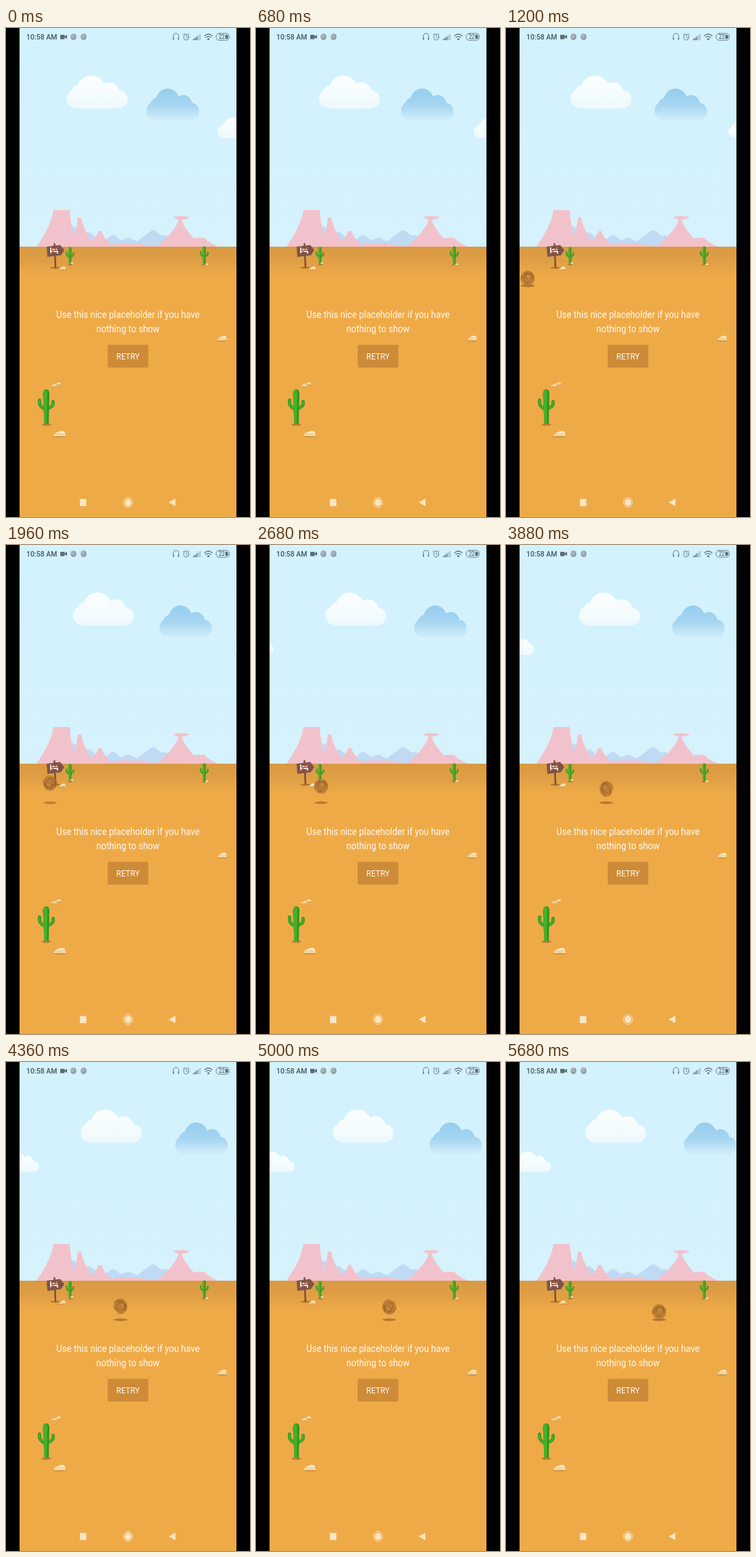
An HTML page with a canvas that plays this animation: 360 by 720 pixels, repeating every 5.72 s.

```html
<!DOCTYPE html>
<html lang="en">
<head>
<meta charset="utf-8">
<title>Desert placeholder</title>
<style>
  html, body { margin: 0; width: 100%; height: 100%; overflow: hidden; background: #000; }
  canvas { display: block; width: 360px; height: 720px; }
</style>
</head>
<body>
<canvas id="stage"></canvas>
<script>
const LOOP = 5720, STEP = 40, TALL = 1.12, HORIZON = 322;
const FONT = 'Roboto, "Noto Sans", sans-serif';
const canvas = document.getElementById('stage');
const ctx = canvas.getContext('2d');
const dpr = window.devicePixelRatio || 1;
canvas.width = 360 * dpr;
canvas.height = 720 * dpr;

const mix = (a, b, k) => a + (b - a) * k;

function at(x, y, sx, sy, draw) {
  ctx.save();
  ctx.translate(x, y);
  ctx.scale(sx, sy);
  draw();
  ctx.restore();
}

function fade(y0, y1, ...stops) {
  const g = ctx.createLinearGradient(0, y0, 0, y1);
  stops.forEach((c, i) => g.addColorStop(i / (stops.length - 1), c));
  return g;
}

function rect(x, y, w, h, fill, r = 0) {
  ctx.fillStyle = fill;
  ctx.beginPath();
  ctx.roundRect(x, y, w, h, r);
  ctx.fill();
}

function oval(x, y, rx, ry, fill) {
  ctx.fillStyle = fill;
  ctx.beginPath();
  ctx.ellipse(x, y, rx, ry, 0, 0, 7);
  ctx.fill();
}

function ring(x, y, rx, ry, stroke, width) {
  ctx.strokeStyle = stroke;
  ctx.lineWidth = width;
  ctx.beginPath();
  ctx.ellipse(x, y, rx, ry, 0, 0, 7);
  ctx.stroke();
}

function shape(d, fill) {
  ctx.fillStyle = fill;
  ctx.fill(new Path2D(d));
}

function line(d, stroke, width) {
  ctx.strokeStyle = stroke;
  ctx.lineWidth = width;
  ctx.lineCap = 'round';
  ctx.stroke(new Path2D(d));
}

function text(str, x, y, size, color, weight = 400, align = 'center') {
  at(x, y, 1, TALL, () => {
    ctx.font = `${weight} ${size}px ${FONT}`;
    ctx.textAlign = align;
    ctx.fillStyle = color;
    ctx.fillText(str, 0, 0);
  });
}

function rng(seed) {
  return () => (seed = (seed * 16807) % 2147483647) / 2147483647;
}

// One outline, 90 by 49, serves all clouds
const WHITE = ['#fbfeff', '#f6fcfe', '#edf9fd'];
const BLUE = ['#97cdee', '#a5d5f1', '#d3eefa'];

function puff(x, y, r) {
  ctx.moveTo(x + r, y);
  ctx.arc(x, y, r, 0, Math.PI * 2);
}

function cloud(colors, x, y, sx, sy) {
  at(x, y, sx, sy, () => {
    ctx.beginPath();
    puff(14, 34, 14);
    puff(19, 27, 13);
    puff(36, 21, 21);
    puff(63, 25, 15);
    puff(77, 35, 13);
    ctx.rect(12, 28, 66, 20.5);
    ctx.fillStyle = fade(0, 49, ...colors);
    ctx.fill();
  });
}

// A rock tower whose sides flare out towards the ground
function butte(left, right, topL, topR, y) {
  const bend = mix(y, HORIZON, .4);
  shape(`M${left} ${HORIZON}Q${mix(left, topL, .9)} ${bend} ${topL} ${y}H${topR}` +
        `Q${mix(right, topR, .9)} ${bend} ${right} ${HORIZON}Z`, '#f2c2cc');
}

function peak(x, y, half) {
  shape(`M${x - half} ${HORIZON}L${x - 2} ${y}H${x + 2}L${x + half} ${HORIZON}Z`, '#c0daf3');
}

function mountains() {
  peak(98, 292, 36);
  peak(122, 301, 28);
  peak(158, 305, 24);
  peak(180, 309, 30);
  peak(217, 298, 34);
  peak(234, 305, 22);
  butte(45, 104, 70, 94, 268);
  butte(95, 132, 106, 111, 279);
  butte(118, 158, 136, 141, 299);
  butte(138, 232, 165, 195, 317);
  butte(222, 290, 255, 259, 281);
  butte(255, 313, 279, 293, 309);
  shape('M247 278Q258 276 271 278Q268 282 259 282H255Q248 281 247 278Z', '#f2c2cc');
}

function rock(x, y, w, h) {
  oval(x, y + h * .45, w * .55, h * .2, 'rgba(160,105,35,.4)');
  at(x, y, w / 20, h / 9, () => {
    shape('M-10 4Q-7-1-2-2Q2-5 7-3L10 4Z', '#eed6a0');
    shape('M-6 0Q1-5 7-3L8 0Q1-2-6 0Z', '#faebc6');
  });
}

function cactus(x, y, s) {
  at(x, y, s, s, () => {
    oval(0, 0, 7, 1.8, 'rgba(120,70,20,.45)');
    const arms = 'M-10-36V-31Q-9-26-2-23M10-34V-30Q9-26 2-24';
    line(arms, '#2f931d', 4.8);
    line(arms, '#46b02a', 2.6);
    shape('M-5-46Q-4-52 0-52Q4-52 4.5-46L3.5-1H-3Z', '#2f931d');
    shape('M-5-46Q-4-52-1-52Q1.5-50 1.5-46L1-1H-3Z', '#46b02a');
  });
}

function sign() {
  oval(73, 353, 8, 1.5, 'rgba(120,70,20,.45)');
  line('M71.5 318L73 352', '#80523b', 2.6);
  shape('M60 322L80 319.5 86 327 81 334.5 61 337Z', '#7d5445');
  line('M66 324V331.5M66 329H76V331.5M69 326H75', '#ecdcd2', 2);
  line('M66 332L76.5 322.5', '#d4514a', 1.4);
}

function sky(t) {
  rect(20, 0, 320, HORIZON, fade(0, HORIZON, '#d2f2fe', '#d6f2fc'));
  cloud(WHITE, 89.5 + 4.8 * t, 70, 1, 1);
  cloud(BLUE, 207.5 + 9.68 * t, 89, .86, .97);
  const x = 312 + 13.33 * t;
  cloud(WHITE, x < 341 ? x : x - 377.7, 132, .62, .62);
}

function ground() {
  mountains();
  rect(20, HORIZON, 320, 398, '#efaa48');
  rect(20, HORIZON, 320, 44, fade(HORIZON, 366, '#d99942', '#e09f45', '#efaa48'));
  sign();
  cactus(94.5, 348.5, .5);
  cactus(292.5, 348.5, .52);
  rock(83, 353.5, 11, 5);
  rock(97, 346, 5, 3);
  rock(296, 348, 6, 3);
  rock(319, 456.5, 15, 8);
  rock(71, 526, 10, 4);
  rock(77, 523.5, 9, 4);
  rock(79, 597, 20, 9);
  cactus(59.5, 584, 1);
}

// Hop heights; gravity sets how long each one lasts
const HOPS = [11, 7, 18, 13.5, 14, 10, 9, 11, 11, 11];

function lift(t) {
  let left = t - .65;
  if (left < 0) return 0;
  for (const h of HOPS) {
    const time = .165 * Math.sqrt(h), u = left / time;
    if (u < 1) return h * 4 * u * (1 - u);
    left -= time;
  }
  return 0;
}

function tumbleweed(t) {
  const x = 32 + 43.3 * (t - 1.2), h = lift(t);
  oval(x, 379.5, 10.5 - h * .05, 1.9, `rgba(135,82,24,${.6 - h * .006})`);
  at(x, 368.5 - h, 1, TALL, () => {
    ctx.rotate(t * 4.2);
    oval(0, 0, 9.8, 9.8, 'rgba(190,125,55,.55)');
    const rand = rng(77);
    ctx.strokeStyle = 'rgba(145,90,38,.5)';
    ctx.lineWidth = .6;
    for (let i = 0; i < 16; i++) {
      const r = 3 + rand() * 7.2, a = rand() * 6.3, off = (10.5 - r) * .6;
      ctx.beginPath();
      ctx.ellipse(Math.cos(a) * off, Math.sin(a) * off, r, r * mix(.65, 1, rand()), a, 0, 5.4);
      ctx.stroke();
    }
  });
}

function statusBar() {
  const ink = '#5c6e76';
  text('10:58 AM', 30, 17.3, 10.5, '#46545b', 500, 'left');
  rect(80, 10, 6.5, 6.5, ink, 1);
  shape('M86 12.5L90 10V16L86 13.5Z', ink);
  for (const x of [99.5, 114.5]) {
    oval(x, 13, 4.3, 4.8, '#929fa5');
    oval(x - .8, 12, 2.6, 3, '#a9b5ba');
  }
  line('M246.8 16V12.5Q246.8 8 250.8 8Q254.8 8 254.8 12.5V16', ink, .9);
  line('M247.2 15V17M254.4 15V17', ink, 1.4);
  ring(266, 13.5, 3.8, 4.2, ink, .9);
  line('M266 11V13.5L268 15M261.5 10L263.5 8M270.5 10L268.5 8', ink, .8);
  for (let i = 0; i < 5; i++) {
    const h = 2 + i * 1.8;
    rect(276 + i * 2.4, 18 - h, 1.5, h, i < 3 ? ink : '#a5bac3');
  }
  line('M293 11.5Q298.5 6.5 304 11.5M295 14Q298.5 10.8 302 14', ink, 1.2);
  oval(298.5, 16.5, 1.5, 1.5, ink);
  ctx.lineWidth = .9;
  ctx.beginPath();
  ctx.roundRect(310, 8, 19.5, 10, 4.5);
  ctx.stroke();
  text('22', 318.3, 16.2, 7.5, ink, 500);
  shape('M323.5 10H325Q328 10 328 13Q328 16 325 16H323.5Z', ink);
}

function message() {
  const ink = '#fffaf1';
  text('Use this nice placeholder if you have', 180, 426.7, 13.1, ink);
  text('nothing to show', 180, 447.7, 13.1, ink);
  rect(150, 466.5, 60, 33.5, '#cd8b38', 2);
  text('RETRY', 180, 488, 11.5, ink);
}

function navBar() {
  const ink = '#fbe6c4';
  rect(109, 693.5, 9.5, 10.5, ink);
  oval(180, 698.5, 4.8, 5.4, ink);
  ring(180, 698.5, 6.5, 7.3, ink, 1);
  shape('M240 698.5L250 693V704Z', ink);
}

function draw(t) {
  ctx.setTransform(dpr, 0, 0, dpr, 0, 0);
  ctx.fillStyle = '#000';
  ctx.fillRect(0, 0, 360, 720);
  ctx.save();
  ctx.beginPath();
  ctx.rect(20, 0, 320, 720);
  ctx.clip();
  sky(t);
  ground();
  tumbleweed(t);
  statusBar();
  message();
  navBar();
  ctx.restore();
}

const start = performance.now();
function tick() {
  const ms = (performance.now() - start) % LOOP;
  draw(Math.floor(ms / STEP) * STEP / 1000);
  requestAnimationFrame(tick);
}
tick();
</script>
</body>
</html>
```
